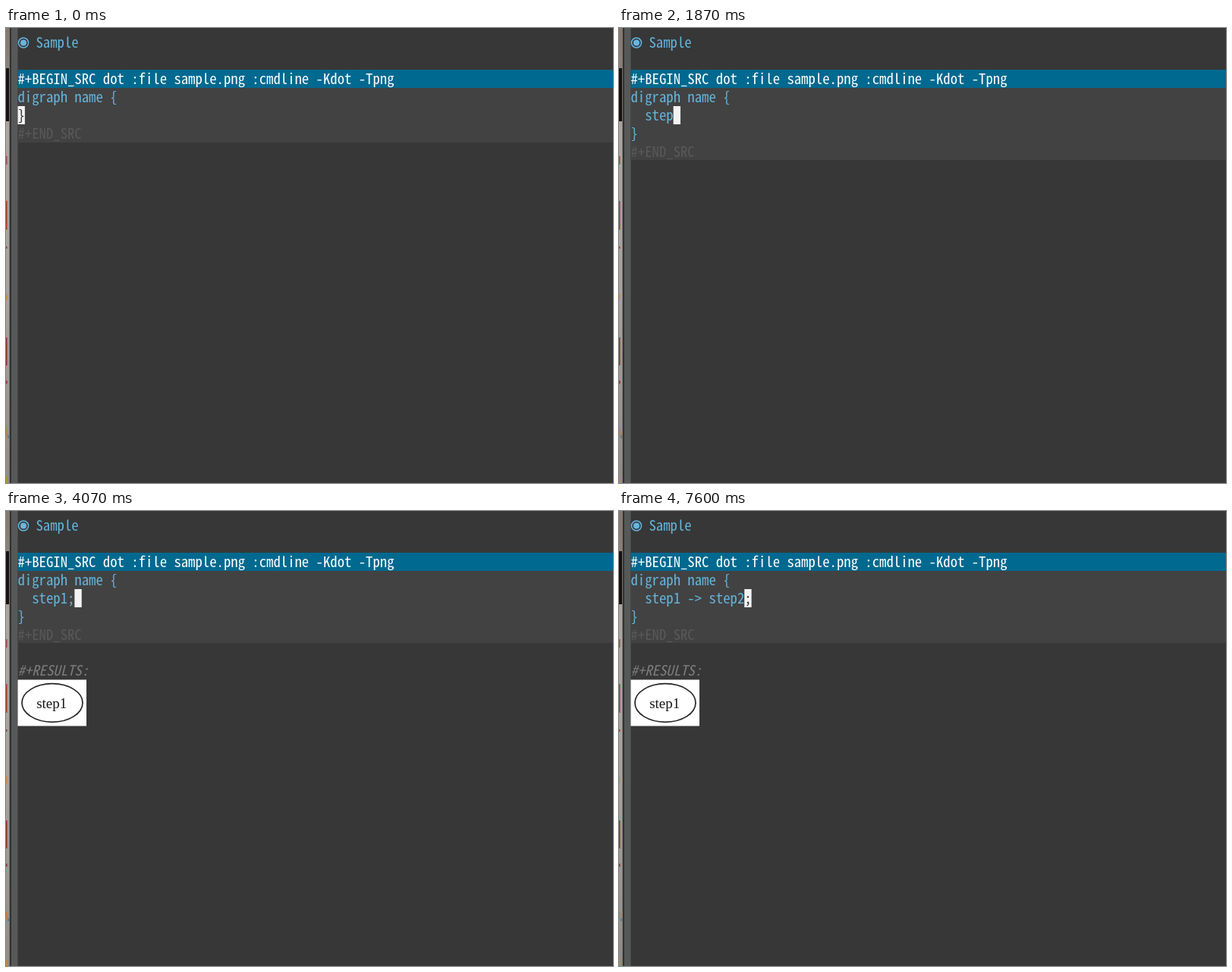
Recreate the animation shown at these times as an HTML page with a canvas. Size 800 by 600 pixels, loop 8 s.

```html
<!DOCTYPE html>
<html lang="en">
<head>
<meta charset="utf-8">
<title>Editor session</title>
<style>
html, body { margin: 0; width: 100%; height: 100%; overflow: hidden; background: #373737; }
canvas { display: block; }
</style>
</head>
<body>
<canvas id="stage" width="800" height="600"></canvas>
<script>
const ctx = document.getElementById('stage').getContext('2d');
const LOOP = 8000, LEFT = 15.5, CELL = 9.36, PITCH = 23.9, TOP = 7.2;
const FAMILY = '"Noto Sans Mono CJK JP", "Noto Sans Mono CJK SC", "Noto Sans Mono", monospace';
const color = {
  page: '#373737', block: '#424242', bar: '#00698f', text: '#65b5dc',
  faint: '#595959', result: '#7c7c7c', cursor: '#f3f3f3', popup: '#575757',
  match: '#737373', matchText: '#b5e6fb'
};

// Font size that makes one character exactly one cell wide.
ctx.font = `100px ${FAMILY}`;
const SIZE = CELL * 100 / ctx.measureText('n').width;

// Each step: start time, text before the cursor, text after it.
const typing = [
  [470, '', ''], [1270, ' ', ''], [1330, '  ', ''], [1400, '  s', ''],
  [1670, '  ste', ''], [1870, '  step', ''], [2330, '  step1', ''],
  [2730, '  step1;', ''], [4730, '  step1', ';'], [5200, '  step1 ', ';'],
  [5470, '  step1 -', ';'], [5730, '  step1 ->', ';'], [6000, '  step1 -> ', ';'],
  [6470, '  step1 -> s', ';'], [6800, '  step1 -> st', ';'],
  [6930, '  step1 -> ste', ';'], [7000, '  step1 -> step', ';'],
  [7130, '  step1 -> step2', ';']
];

const colX = col => LEFT + col * CELL;
const rowY = row => Math.round(TOP + row * PITCH);

function rect(x, y, w, h, fill) {
  ctx.fillStyle = fill;
  ctx.fillRect(x, y, w, h);
}

function textAt(str, x, y, fill, style = '') {
  ctx.font = `${style} ${SIZE}px ${FAMILY}`;
  ctx.fillStyle = fill;
  ctx.fillText(str, x, y + 19);
}

function line(str, row, fill, style) {
  textAt(str, LEFT, rowY(row), fill, style);
}

function cursor(col, row, char = '') {
  rect(colX(col), rowY(row), CELL, 24, color.cursor);
  if (char) textAt(char, colX(col), rowY(row), '#303030');
}

function drawEdge() {
  const strip = ctx.createLinearGradient(0, 0, 0, 600);
  strip.addColorStop(0, '#85786c');
  strip.addColorStop(0.09, '#8c8176');
  strip.addColorStop(0.22, '#aaa69f');
  strip.addColorStop(0.6, '#a5a29d');
  strip.addColorStop(1, '#8f8b85');
  rect(0, 0, 5, 600, strip);
  rect(0, 53, 4, 70, '#15120f');
  for (const [y, h, fill] of [
    [169, 11, '#9b4a40'], [228, 38, '#a33b26'], [288, 3, '#a33b26'],
    [350, 9, '#c48a45'], [408, 37, '#8f2f25'], [465, 4, '#8f2f25'],
    [528, 10, '#b78038'], [591, 9, '#c28a2d']
  ]) rect(0, y, 1.5, h, fill);
  rect(2, 537, 2, 4, '#587d91');
  rect(4, 0, 1, 600, '#777674');
  rect(5, 0, 2, 600, '#303234');
  rect(7, 0, 8.5, 600, '#565958');
}

function drawHeading() {
  ctx.strokeStyle = ctx.fillStyle = '#66b7e3';
  ctx.lineWidth = 1.5;
  ctx.beginPath();
  ctx.arc(23, 19.5, 6.5, 0, Math.PI * 2);
  ctx.stroke();
  ctx.beginPath();
  ctx.arc(23, 19.5, 4, 0, Math.PI * 2);
  ctx.fill();
  textAt('Sample', 39.5, rowY(0), color.text);
}

function drawPopup() {
  const top = rowY(5), x = colX(1), wide = 7 * CELL;
  rect(x, top, 800 - x, rowY(7) - top, color.page);
  rect(colX(8), rowY(6), CELL, 24, color.block);
  textAt('C', colX(8), rowY(6), color.faint);
  rect(x, top, wide, 144, color.popup);
  rect(x, top, wide, 24, color.bar);
  rect(colX(2), top + 24, 4 * CELL, 120, color.match);
  ['', '1', '2', '3', '4', 's'].forEach((suffix, i) => {
    const y = top + i * 24;
    textAt('step', colX(2), y, i ? color.matchText : '#d3f0fc', i ? '' : 'bold');
    textAt(suffix, colX(6), y, color.text);
  });
}

function drawResult() {
  line('#+RESULTS:', 8, color.result, 'italic');
  rect(LEFT, 222.5, 90.5, 61, '#fff');
  ctx.strokeStyle = '#252525';
  ctx.lineWidth = 1.7;
  ctx.beginPath();
  ctx.ellipse(61, 253, 40, 25.3, 0, 0, Math.PI * 2);
  ctx.stroke();
  ctx.font = '19px "Liberation Serif", serif';
  ctx.fillStyle = '#151515';
  ctx.textAlign = 'center';
  ctx.fillText('step1', 60.2, 259.5);
  ctx.textAlign = 'left';
}

function draw(t) {
  const step = typing.filter(([start]) => t >= start).pop();
  const closeRow = step ? 5 : 4;

  rect(0, 0, 800, 600, color.page);
  drawEdge();
  drawHeading();
  rect(LEFT, rowY(2), 800 - LEFT, 24, color.bar);
  rect(LEFT, rowY(3), 800 - LEFT, rowY(closeRow + 2) - rowY(3), color.block);
  line('#+BEGIN_SRC dot :file sample.png :cmdline -Kdot -Tpng', 2, '#fff');
  line('digraph name {', 3, color.text);
  line('}', closeRow, color.text);
  line('#+END_SRC', closeRow + 1, color.faint);

  if (step) {
    const [, before, after] = step;
    line(before, 4, color.text);
    cursor(before.length, 4, after);
  } else if (t < 70) {
    cursor(0, 4, '}');
  } else if (t < 200) {
    cursor(0, 3, 'd');
  } else {
    cursor(14, 3);
  }

  if (t >= 2270 && t < 2330) drawPopup();
  if (t >= 4070) drawResult();
}

const begin = performance.now();
function tick() {
  draw((performance.now() - begin) % LOOP);
  requestAnimationFrame(tick);
}
tick();
</script>
</body>
</html>
```
